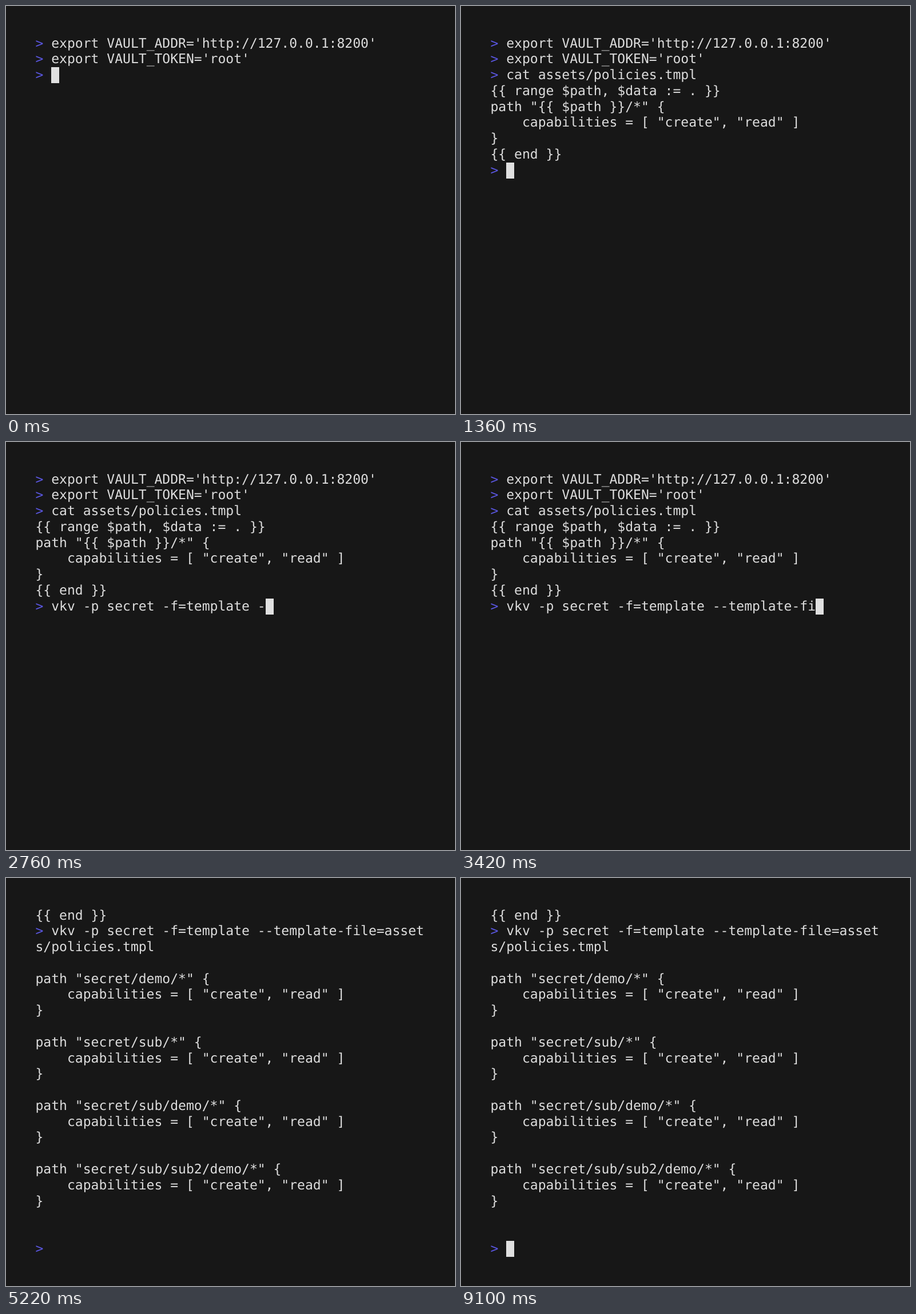
An HTML page for the animation above (9.2 s loop, 785 by 714 pixels).

```html
<!DOCTYPE html>
<html lang="en">
<head>
<meta charset="utf-8">
<style>
html, body { margin: 0; width: 100%; height: 100%; overflow: hidden; background: #171717; }
pre {
  position: absolute; left: 51.5px; top: 52.5px; margin: 0; color: #ddd;
  font: 23.04px/27.78px "DejaVu Sans Mono", monospace;
  text-rendering: geometricPrecision;
}
pre b { color: #5a56e0; font-weight: normal; }
#cursor { position: absolute; width: 13.87px; height: 27.78px; background: #e0e0e0; }
</style>
</head>
<body>
<pre id="screen"></pre>
<div id="cursor"></div>
<script>
const LOOP = 9200, COLS = 49, ROWS = 22, CELL = 13.87, LINE = 27.78, PAD = 51.5;
const DELAY = 80, KEY = 52.5, DONE = 4660, BLINK = 554;  // ms
const screenEl = document.getElementById('screen');
const cursorEl = document.getElementById('cursor');

const rule = path => `path "${path}/*" {\n    capabilities = [ "create", "read" ]\n}\n`;
const intro = "> export VAULT_ADDR='http://127.0.0.1:8200'\n> export VAULT_TOKEN='root'\n> ";
const cat = 'cat assets/policies.tmpl';
const template = `\n{{ range $path, $data := . }}\n${rule('{{ $path }}')}{{ end }}\n> `;
const vkv = 'vkv -p secret -f=template --template-file=assets/policies.tmpl';
const policies = '\n' + ['demo', 'sub', 'sub/demo', 'sub/sub2/demo']
  .map(p => rule('secret/' + p)).join('\n') + '\n\n> ';

// Every key press or output adds one piece of text.
const pieces = [...cat, template, ...vkv, '\n', policies];

function wrap(line) {
  const rows = [];
  for (let i = 0; i <= line.length; i += COLS) rows.push(line.slice(i, i + COLS));
  return rows;
}

let shown = -1;
function draw(t) {
  const typed = Math.max(0, Math.floor((t - DELAY) / KEY) + 1);
  const count = t >= DONE ? pieces.length : typed;
  if (count !== shown) {
    shown = count;
    const text = intro + pieces.slice(0, count).join('');
    const rows = text.split('\n').flatMap(wrap).slice(-ROWS);
    screenEl.innerHTML = rows.join('\n').replace(/^>/gm, '<b>&gt;</b>');
    cursorEl.style.left = PAD + rows.at(-1).length * CELL + 'px';
    cursorEl.style.top = PAD + (rows.length - 1) * LINE + 'px';
  }
  const hidden = t >= DONE && Math.floor((t - DONE) / BLINK) % 2;
  cursorEl.style.visibility = hidden ? 'hidden' : 'visible';
}

const start = performance.now();
function frame() {
  draw((performance.now() - start) % LOOP);
  requestAnimationFrame(frame);
}
frame();
</script>
</body>
</html>
```
